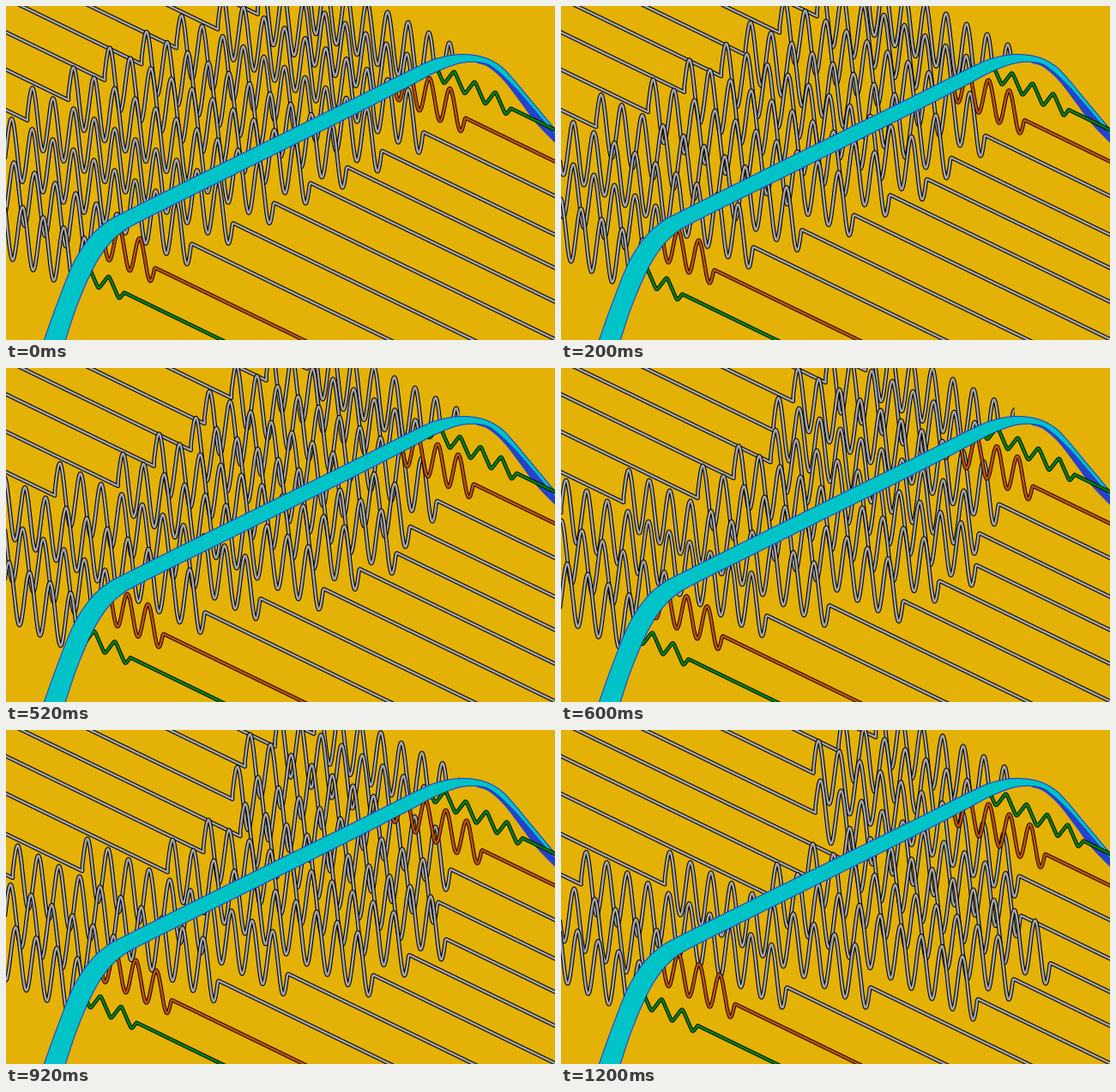
Recreate the animation shown at these times as a matplotlib script. Size 640 by 390 pixels, loop 1400 ms.

```python
import numpy as np
import matplotlib.pyplot as plt
from matplotlib.animation import FuncAnimation
from matplotlib.patches import Polygon

W, H, DPI = 640, 390, 100
PX = 72 / DPI
FRAMES, INTERVAL = 7, 200

GOLD, GREY, ORANGE, GREEN = "#e4b106", "#a4a4a4", "#c05000", "#008400"
CYAN, BLUE = "#00c3c7", "#2442cc"

PERIOD, CYCLES = 24, 10
LENGTH = PERIOD * CYCLES
LINE_SLOPE, WAVE_SLOPE = 0.487, 0.5

# intercept of the line, front of the packet at the start, pixels per step
GREY_ROWS = [
    (-167.3, 582.5, 4.0), (-130.3, 533.0, 5.0), (-90.0, 486.5, 7.9),
    (-44.8, 438.3, 16.3), (-6.0, 397.5, 28.8), (33.5, 354.5, 28.8),
    (77.2, 312.3, 28.9), (124.3, 264.5, 16.0), (171.8, 216.2, 7.8),
    (220.8, 171.0, 5.0), (267.3, 133.0, 4.0),
]
TINTED_ROWS = [
    (-130.3, 535.2, 4.85, ORANGE, 22), (220.8, 173.5, 4.85, ORANGE, 22),
    (-167.3, 588.0, 3.4, GREEN, 9.5), (267.3, 137.3, 3.6, GREEN, 9.5),
]


def smooth(points, steps=12):
    """Catmull-Rom curve through the points."""
    p = np.array(points, float)
    p = np.vstack([2 * p[0] - p[1], p, 2 * p[-1] - p[-2]])
    t = np.linspace(0, 1, steps, endpoint=False)[:, None]
    parts = [
        0.5 * (2 * b + (c - a) * t + (2 * a - 5 * b + 4 * c - d) * t**2
               + (3 * b - a - 3 * c + d) * t**3)
        for a, b, c, d in zip(p, p[1:], p[2:], p[3:])
    ]
    return np.vstack(parts + [p[-2:-1]])


def packet(intercept, front, amp, sharp=False):
    """Straight line, ten vertical swings, straight line again."""
    t = np.linspace(0, LENGTH - 1, 700)
    swing = np.sin(2 * np.pi * t / PERIOD)
    if sharp:
        swing = np.arcsin(0.96 * swing) / np.arcsin(0.96)
    front_y = intercept + LINE_SLOPE * front
    back_x, back_y = front - LENGTH, front_y - WAVE_SLOPE * LENGTH
    axis = back_y + 2.5 - 0.28 * amp + WAVE_SLOPE * t
    x = np.r_[-400, back_x, back_x + t, front, 700]
    y = np.r_[back_y - LINE_SLOPE * (back_x + 400), back_y, axis - amp * swing,
              front_y, intercept + LINE_SLOPE * 700]
    return x, y


fig = plt.figure(figsize=(W / DPI, H / DPI), dpi=DPI, facecolor=GOLD)
ax = fig.add_axes([0, 0, 1, 1])
ax.set_xlim(-0.5, W - 0.5)
ax.set_ylim(H - 0.5, -0.5)
ax.axis("off")

upper = smooth([(43, 392), (58, 350), (78, 300), (98, 269), (118, 251),
                (140, 239), (250, 184), (400, 110), (480, 70), (505, 60),
                (530, 56), (555, 59), (575, 69), (590, 84), (610, 108),
                (645, 150)])
lower = smooth([(68, 392), (82, 350), (100, 308), (116, 282), (134, 264),
                (160, 249), (250, 204), (400, 129), (470, 93), (500, 77),
                (530, 66), (556, 66), (572, 75), (590, 92), (606, 110),
                (645, 156)])
shade = smooth([(548, 66), (562, 71), (580, 87), (600, 113), (618, 137),
                (645, 165)])

straight = lower[lower[:, 0] < 530]
below = np.vstack([straight, [(560, 55), (660, 55), (660, 400), (68, 400)]])
above = np.vstack([straight, [(530, 0), (530, -20), (-20, -20), (-20, 400)]])

ax.add_patch(Polygon(np.vstack([shade, upper[upper[:, 0] > 550][::-1]]),
                     fc=BLUE, ec="none", zorder=1))
ax.add_patch(Polygon(np.vstack([upper, lower[::-1]]), fc=CYAN, ec=BLUE,
                     lw=1.1 * PX, zorder=3))


def stroke(color, widths, zorder, region=None):
    """A coloured line on a wider black one."""
    pair = [ax.plot([], [], color=c, lw=w * PX, zorder=zorder,
                    solid_joinstyle="round")[0]
            for c, w in zip(("black", color), widths)]
    if region is not None:
        clip = Polygon(region, fc="none", ec="none", transform=ax.transData)
        ax.add_patch(clip)
        for line in pair:
            line.set_clip_path(clip)
    return pair


tracks = []
for i, (intercept, front, speed) in enumerate(GREY_ROWS):
    outer = i < 2 or i > 8
    pair = stroke(GREY, (4.6, 2.5), 2, above if outer else None)
    tracks.append((pair, intercept, front, speed, 34, False))
for intercept, front, speed, color, amp in TINTED_ROWS:
    pair = stroke(color, (4.4, 2.6), 4, below)
    tracks.append((pair, intercept, front, speed, amp, color == GREEN))


def draw(step):
    for pair, intercept, front, speed, amp, sharp in tracks:
        x, y = packet(intercept, front + speed * step, amp, sharp)
        for line in pair:
            line.set_data(x, y)
    return [line for track in tracks for line in track[0]]


anim = FuncAnimation(fig, draw, frames=FRAMES, interval=INTERVAL,
                     repeat=True, repeat_delay=0)
plt.show()
```
